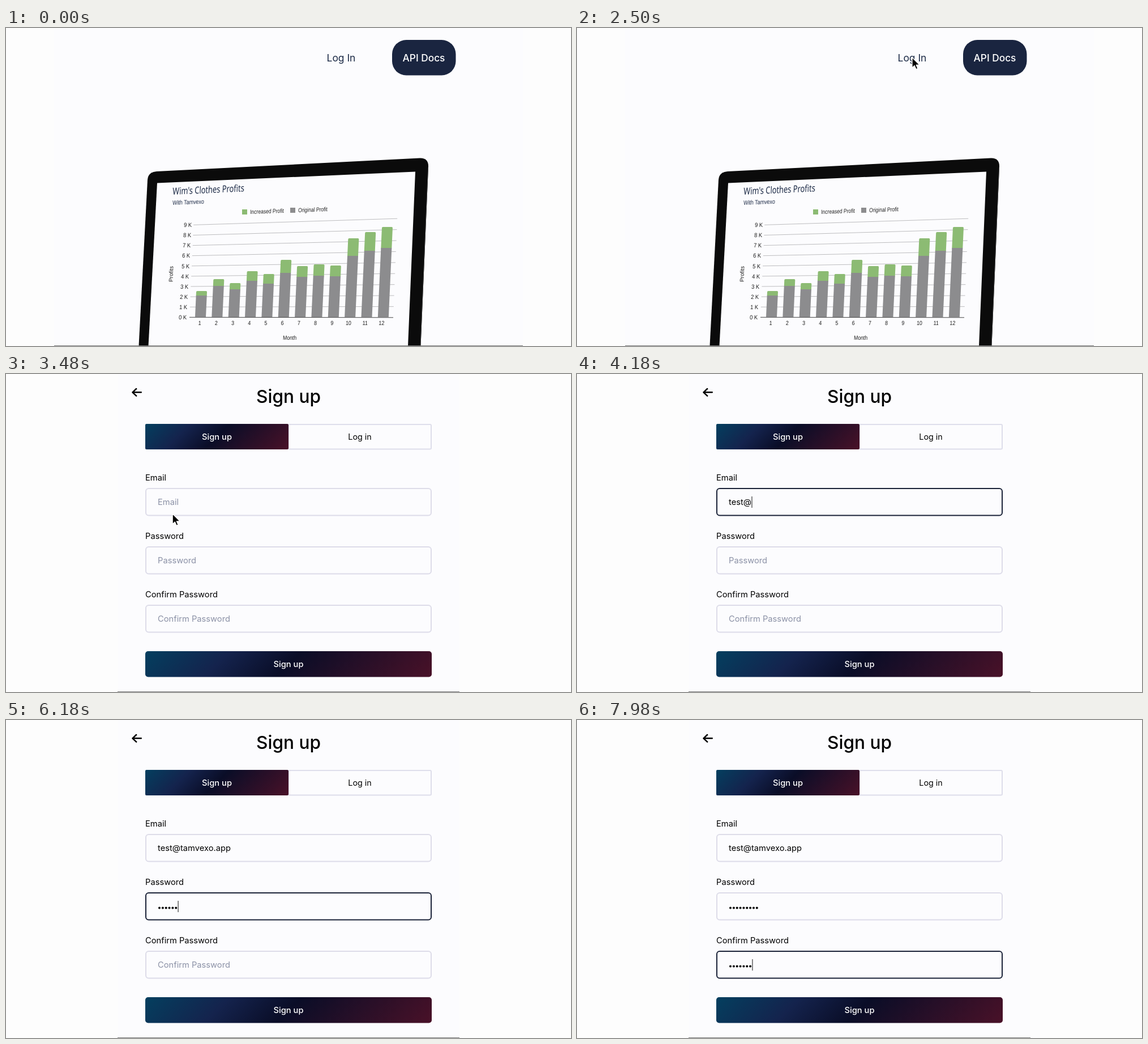
These frames come from a looping animation (998x561 px, 8000 ms). An HTML page:

```html
<!DOCTYPE html>
<html lang="en">
<head>
<meta charset="utf-8">
<title>Sign up demo</title>
<style>
  html, body { margin: 0; width: 100%; height: 100%; overflow: hidden; background: #fdfdfd; }
  svg { display: block; width: 100%; height: 100%; }
  text { font-family: Inter, "Open Sans", sans-serif; white-space: pre; }
  .chart text { font-family: "Liberation Sans", Arial, sans-serif; }
  .chart .head { font-family: "Noto Sans", "Open Sans", sans-serif; }
</style>
</head>
<body>
<svg id="stage" viewBox="0 0 998 561">
  <defs>
    <linearGradient id="tab" gradientUnits="userSpaceOnUse" x1="298" y1="36" x2="447" y2="185">
      <stop offset="0" stop-color="#043f5f"/><stop offset=".27" stop-color="#14234d"/>
      <stop offset=".5" stop-color="#0a0d27"/><stop offset="1" stop-color="#491128"/>
    </linearGradient>
    <linearGradient id="btn" href="#tab" x1="361" y1="374" x2="637" y2="649"/>
  </defs>
</svg>
<script>
const LOOP = 8000;
const stage = document.getElementById('stage');

function add(parent, tag, attrs, content) {
  const el = document.createElementNS('http://www.w3.org/2000/svg', tag);
  for (const k in attrs) el.setAttribute(k, attrs[k]);
  if (content !== undefined) el.textContent = content;
  parent.appendChild(el);
  return el;
}
const rect = (p, x, y, width, height, fill, more) =>
  add(p, 'rect', { x, y, width, height, fill, ...more });
const label = (p, x, y, str, size, fill, more) =>
  add(p, 'text', { x, y, 'font-size': size, fill, ...more }, str);
const show = (el, on) => el.setAttribute('visibility', on ? 'inherit' : 'hidden');
const middle = { 'text-anchor': 'middle' };

// Landing page
const landing = add(stage, 'g', {});
rect(landing, 85, 0, 828, 561, '#fcfcfe');
label(landing, 592, 58.5, 'Log In', 17.4, '#1b2945', middle);
rect(landing, 682, 21, 112.5, 62.5, '#1a2540', { rx: 25 });
label(landing, 738, 58.5, 'API Docs', 17.3, '#fff', { ...middle, 'font-weight': 500 });

add(landing, 'path', {
  fill: '#0b0b0b',
  d: 'M234.5 561L250 268Q251 254 266 253L731 229.5Q746 229 746 244L732.5 561Z'
});
add(landing, 'path', { d: 'M745.5 246L732 561', stroke: '#3a3a3a', fill: 'none' });
add(landing, 'path', { d: 'M267 273.5L723 253.5L710 561H251.5Z', fill: '#fcfcfe' });

const chart = add(landing, 'g', { class: 'chart' });

// Text lying on the tilted screen
const tilted = (x, y, slope, str, size, sx, fill, more) =>
  label(chart, 0, 0, str, size, fill,
    { transform: `matrix(${sx} ${slope * sx} -.045 1 ${x} ${y})`, ...more });

tilted(294, 294, -.045, "Wim's Clothes Profits", 17, .755, '#1b2945', { class: 'head' });
tilted(294, 312, -.04, 'With Tamvexo', 11, .81, '#1b2945');
rect(chart, 417, 320, 9, 9, '#8cbb73');
tilted(431, 328, -.035, 'Increased Profit', 10.5, .812, '#222');
rect(chart, 502, 317, 9, 9, '#8c8c8e');
tilted(516, 325, -.035, 'Original Profit', 10.5, .812, '#222');

for (let k = 0; k < 10; k++) {
  add(chart, 'line', {
    x1: 324 + .8 * k, y1: 510.3 - 18.1 * k, x2: 684 + .8 * k, y2: 510.8 - 19.4 * k,
    stroke: k ? '#bdbdbf' : '#444', 'stroke-width': 1
  });
  tilted(319 + k, 514 - 18.1 * k, 0, k + ' K', 10.6, .88, '#1c1c1c', { 'text-anchor': 'end' });
}

const LEAN = .045, BASE = 510;
const totals = [464, 443, 450, 429, 434, 409, 420, 417, 419, 371, 360, 351];
const splits = [472, 455, 461, 446, 451, 432, 439, 437, 438, 402, 393, 388];
totals.forEach((top, i) => {
  const bar = add(chart, 'g', {
    transform: `matrix(1 0 ${-LEAN} 1 ${334 + 29.35 * i} ${BASE})`
  });
  rect(bar, 0, top - BASE, 19, splits[i] - top + 2, '#8cbb73', { rx: 1.8 });
  rect(bar, 0, splits[i] - BASE, 19, BASE - splits[i], '#8c8c8e');
  tilted(342 + 29.2 * i, 524, 0, i + 1, 10.5, .84, '#1c1c1c', middle);
});
tilted(501, 549.5, 0, 'Month', 10.5, .82, '#1c1c1c', middle);
label(chart, 0, 0, 'Profits', 9.9, '#1c1c1c',
  { ...middle, transform: 'translate(295 434) rotate(-88)' });
rect(landing, 85, 560, 828, 1, '#777');

// Sign-up form
const form = add(stage, 'g', {});
rect(form, 197, 0, 604, 561, '#fcfcfe');
rect(form, 197, 560, 604, 1, '#777');
add(form, 'path', {
  d: 'M238.8 32.3H224M230.2 26L223.5 32.3L230.2 38.6', fill: 'none', stroke: '#000',
  'stroke-width': 2.5, 'stroke-linecap': 'round', 'stroke-linejoin': 'round'
});
label(form, 499, 51, 'Sign up', 31.6, '#000', { ...middle, 'font-weight': 450 });
rect(form, 499, 89, 252, 43.5, 'none', { stroke: '#dedeeb', 'stroke-width': 2, rx: 2 });
rect(form, 246, 88, 253, 45, 'url(#tab)', { rx: 2 });
label(form, 372.5, 115.5, 'Sign up', 14.7, '#fff', { ...middle, 'font-weight': 500 });
label(form, 625, 115.5, 'Log in', 14.3, '#000', middle);
rect(form, 246, 489, 506, 45.5, 'url(#btn)', { rx: 5 });
label(form, 499, 517, 'Sign up', 14.7, '#fff', { ...middle, 'font-weight': 500 });

// Keystroke times: count keys from a start, one every step ms
const keys = (start, step, count) => Array.from({ length: count }, (_, i) => start + step * i);
const DOT = 5.85, LEFT = 268;

function field(name, y, focus, blur, times, value) {
  label(form, 246, y - 38, name, 14.7, '#000');
  const box = rect(form, 247, y - 23.5, 504, 47.5, 'none', { 'stroke-width': 2, rx: 5 });
  const hint = label(form, LEFT, y + 5.3, name, 14.7, '#8b91a6');
  const text = value && label(form, LEFT, y + 5.3, '', 14.7, '#000');
  const dots = value ? [] : times.map((_, i) =>
    add(form, 'circle', { cx: 271 + DOT * i, cy: y + 3, r: 2, fill: '#000' }));
  const caret = rect(form, 0, y - 9.5, 1, 20, '#111');

  return t => {
    const typed = times.filter(k => k <= t).length;
    const active = t >= focus && t < blur;
    box.setAttribute('stroke', active ? '#1a2238' : '#dddce9');
    show(hint, !typed);
    dots.forEach((d, i) => show(d, i < typed));
    if (text) text.textContent = value.slice(0, typed);
    const width = text ? (typed ? text.getComputedTextLength() : 0) : DOT * typed;
    caret.setAttribute('x', LEFT + width + .5);
    const idle = t - (typed ? times[typed - 1] : focus);
    show(caret, active && idle % 1000 < 500);
  };
}

const fields = [
  field('Email', 225.5, 3560, 5120,
    [...keys(3620, 130, 5), ...keys(4260, 68, 11)], 'test@tamvexo.app'),
  field('Password', 328.5, 5120, 6800, keys(5420, 130, 9)),
  field('Confirm Password', 431.5, 6800, LOOP, keys(7130, 130, 7))
];

// Mouse pointer
const pointer = add(stage, 'path', {
  d: 'M0 0V16.5L3.8 13L6.3 18.8L9 17.7L6.5 12H11.8Z',
  fill: '#000', stroke: '#fff', 'stroke-width': 1.1, 'stroke-linejoin': 'round'
});
const OPEN = 2600;
const moves = [
  { from: 1150, to: 1560, end: 1560, a: [152, 572], b: [344.5, 298] },
  { from: 1560, to: 2050, end: OPEN, a: [344.5, 298], b: [592, 52], ease: true },
  { from: 3290, to: 3540, end: 3620, a: [195, 561], b: [300, 228], ease: true }
];

function movePointer(t) {
  const m = moves.find(m => t >= m.from && t < m.end);
  show(pointer, m);
  if (!m) return;
  let p = Math.min(1, (t - m.from) / (m.to - m.from));
  if (m.ease) p = 1 - (1 - p) ** 2;
  const [x, y] = m.a.map((v, i) => v + (m.b[i] - v) * p);
  pointer.setAttribute('transform', `translate(${x} ${y}) scale(1.1)`);
}

function draw(t) {
  show(landing, t < OPEN);
  show(form, t >= OPEN);
  fields.forEach(update => update(t));
  movePointer(t);
}

const start = performance.now();
function tick(now) {
  draw(Math.max(0, now - start) % LOOP);
  requestAnimationFrame(tick);
}
draw(0);
requestAnimationFrame(tick);
</script>
</body>
</html>
```
